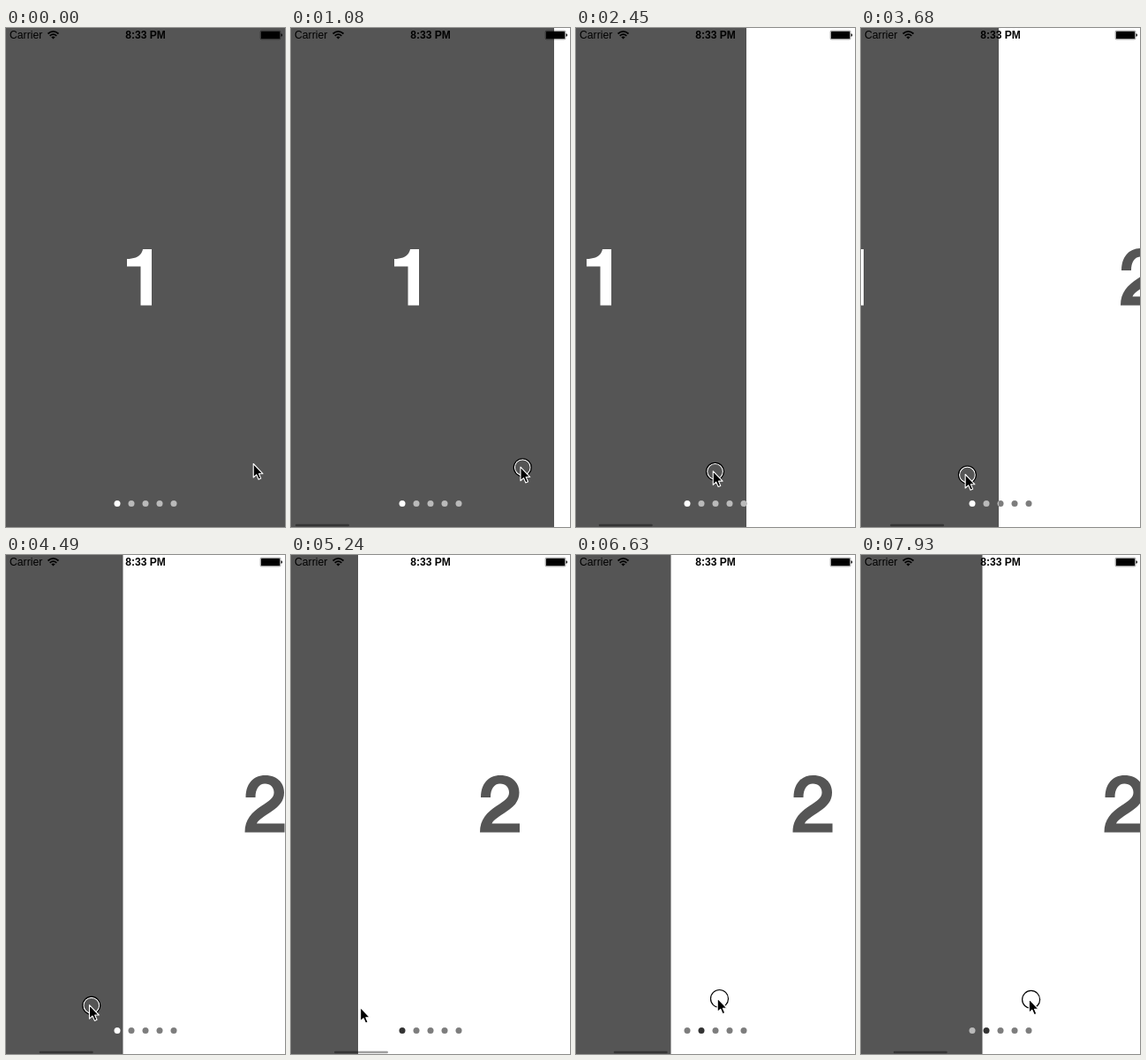
These frames come from a looping animation (316 by 564 pixels, 7.99 s). An HTML page:

```html
<!DOCTYPE html>
<html lang="en">
<head>
<meta charset="utf-8">
<title>Paged scroll view</title>
<style>
  html, body { margin: 0; height: 100%; overflow: hidden; background: #fff; }
  svg { display: block; width: 100vw; height: 100vh; }
  text { font-family: "Liberation Sans", Arial, sans-serif; font-size: 12px; }
</style>
</head>
<body>
<svg viewBox="0 0 316 564">
  <defs>
    <clipPath id="left"><rect id="leftBox" x="-4" width="0" height="564"/></clipPath>
    <clipPath id="right"><rect id="rightBox" width="330" height="564"/></clipPath>
  </defs>
  <rect width="316" height="564" fill="#fff"/>
  <!-- Two pages; x = 0 is the border between them -->
  <g id="pages">
    <rect x="-320" width="320" height="564" fill="#555"/>
    <path aria-label="1" fill="#fff" transform="translate(-181 250)"
      d="M28 0V63.5H15.5V19.500H0V11C9 11 16.500 8 18 0Z"/>
    <path aria-label="2" fill="#555" transform="translate(138 249)"
      d="M1 25C1 9 10 0 23 0C36 0 44.500 8 44.500 19.500C44.500 29 39 35 30 41C22 46.500 15.500 50 13.500 54.500H45V64.500H0C0 49.500 8 42 19 34.500C28 28.500 33 25.500 33 19.500C33 13.500 29 9.500 22.800 9.500C16 9.500 12 15.500 12 25Z"/>
  </g>
  <rect id="bar" y="560.700" width="61" height="2.500" rx="1.250" fill-opacity=".38"/>
  <g id="lightDots" clip-path="url(#left)"></g>
  <g id="darkDots" clip-path="url(#right)"></g>

  <text x="4" y="12.400" style="font-size:12.200px">Carrier</text>
  <text x="158" y="12.400" text-anchor="middle" font-weight="bold">8:33 PM</text>
  <g fill="none" stroke="#000" stroke-width="1.700">
    <path d="M47.500 6.500Q53.500 1.200 59.500 6.500M49.700 8.800Q53.500 5.600 57.300 8.800"/>
    <path d="M51.300 10.200Q53.500 8.600 55.700 10.200L53.500 12.500Z" fill="#000" stroke="none"/>
  </g>
  <rect x="288.250" y="3.250" width="22.500" height="9.500" rx="1.200" fill="none" stroke="#000" stroke-width=".5"/>
  <rect x="289" y="4" width="21" height="8" rx=".5"/>
  <path d="M311.500 6.200Q313 6.500 313 8T311.500 9.800Z"/>

  <g id="pointer">
    <g id="touch" fill="none" stroke-width="1.200">
      <circle r="8.900" stroke="#fff"/>
      <circle r="10" stroke="#000"/>
    </g>
    <path transform="translate(-2.300 -.5)" stroke="#fff" stroke-width="1.100" stroke-linejoin="round"
      d="M0 0V15.500L3.500 12.300L5.900 17.700L8.500 16.600L6.200 11.300H10.800Z"/>
  </g>
</svg>
<script>
const LOOP = 7990, START = 318, END = -2;
const PRESS = 700, RELEASE = 5140, SETTLED = 5660, PRESS_AGAIN = 5800;
const $ = id => document.getElementById(id);
const clamp = v => Math.min(1, Math.max(0, v));
const easeOut = (u, power) => 1 - (1 - u) ** power;
const set = (id, attrs) => {
  for (const name in attrs) $(id).setAttribute(name, attrs[name]);
};

// Pointer moves; it rests between them
const home = { x: 282.5, y: 493 };
const moves = [
  { from: 60, to: 700, x: 294.5, y: 495.5 },
  { from: 830, to: 1680, x: 203.5, y: 499 },
  { from: 1680, to: 3000, x: 134.5, y: 502.5 },
  { from: 3250, to: 5240, x: 81, y: 512 },
  { from: 5240, to: 5830, x: 42.5, y: 501.5 },
  { from: 5950, to: 6630, x: 162.5, y: 501.5 },
  { from: 6970, to: LOOP, x: 193.5, y: 502.5 }
];

function pointerAt(t) {
  let { x, y } = home;
  for (const m of moves) {
    const k = easeOut(clamp((t - m.from) / (m.to - m.from)), 1.25);
    x += (m.x - x) * k;
    y += (m.y - y) * k;
  }
  return { x, y };
}

// Border between the pages: dragged left, snapping, then dragged back
function edgeAt(t) {
  const dragged = time => Math.min(START, pointerAt(time).x + 35.5);
  if (t < PRESS) return START;
  if (t < RELEASE) return dragged(t);
  if (t < PRESS_AGAIN) {
    const k = easeOut(clamp((t - RELEASE) / (SETTLED - RELEASE)), 2);
    return dragged(RELEASE) + (END - dragged(RELEASE)) * k;
  }
  return Math.max(END, pointerAt(t).x - 55);
}

// The scroll bar shows while scrolling and fades once settled
function barOpacity(t, edge) {
  if (t < SETTLED || edge > END) return edge < START ? 1 : 0;
  return 1 - clamp((t - SETTLED - 30) / 140);
}

for (const id of ["lightDots", "darkDots"])
  for (let i = 0; i < 5; i++)
    $(id).innerHTML += `<circle cx="${126 + 16 * i}" cy="537.5" r="3.5"/>`;

function paintDots(id, page, on, off) {
  [...$(id).children].forEach((dot, i) => dot.setAttribute("fill", i === page ? on : off));
}

function draw(t) {
  const { x, y } = pointerAt(t);
  const edge = Math.round(edgeAt(t) * 2) / 2;
  const page = t < SETTLED ? 0 : 1;
  const pressed = (t >= PRESS && t < RELEASE) || t >= PRESS_AGAIN;
  set("pages", { transform: `translate(${edge} 0)` });
  set("leftBox", { width: edge + 4 });
  set("rightBox", { x: edge });
  set("bar", { x: 1 + (START - edge) * 0.198, opacity: barOpacity(t, edge) });
  paintDots("lightDots", page, "#fff", "#bababa");
  paintDots("darkDots", page, "#333", "#7d7d7d");
  set("pointer", { transform: `translate(${x} ${y})` });
  set("touch", { visibility: pressed ? "visible" : "hidden" });
}

const begin = performance.now();
function tick() {
  draw((performance.now() - begin) % LOOP);
  requestAnimationFrame(tick);
}
tick();
</script>
</body>
</html>
```
